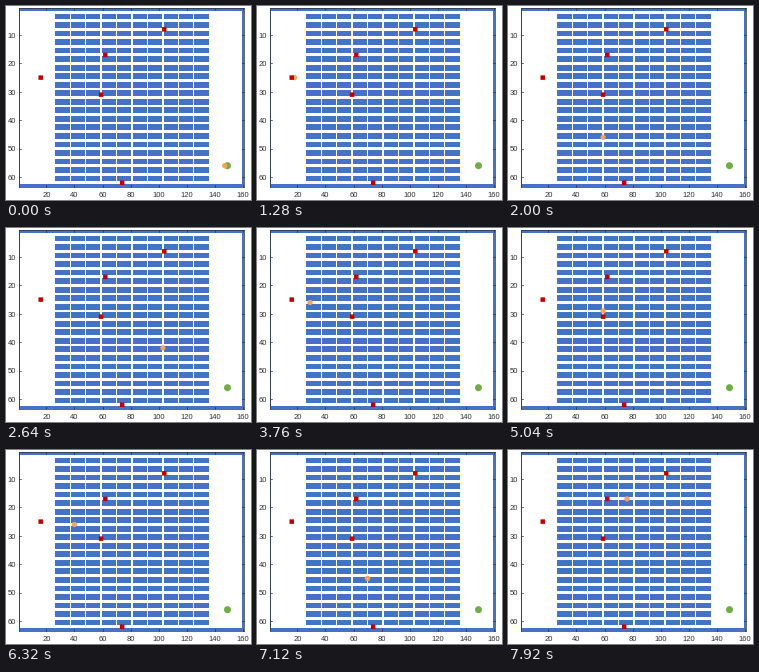
Write a matplotlib script that moves like this. It is 245x194 px and loops after 8000 ms.

```python
from itertools import pairwise

import numpy as np
import matplotlib.pyplot as plt
from matplotlib.animation import FuncAnimation
from matplotlib.patches import Circle, Rectangle

W, H = 245, 194
FRAMES, INTERVAL = 100, 80
SPEED = 10  # grid cells walked per frame

BLUE, RED, GREEN, ORANGE, INK = "#4472C4", "#C00000", "#70AD47", "#F4A45A", "#303030"

plt.rcParams["font.family"] = "Liberation Sans"
fig = plt.figure(figsize=(W / 72, H / 72), dpi=72, facecolor="white")
ax = fig.add_axes([0, 0, 1, 1])
ax.set(xlim=(0, W), ylim=(H, 0))
ax.axis("off")


def px(x):
    return 12.256 + 1.4042 * x


def py(y):
    return 0.57 + 2.8415 * y


def block(x0, y0, x1, y1, color, z):
    """Filled rectangle between two corners in grid units."""
    ax.add_patch(Rectangle((px(x0), py(y0)), px(x1) - px(x0), py(y1) - py(y0),
                           fc=color, ec="none", lw=0, zorder=z))


def line(x0, y0, x1, y1):
    ax.plot([x0, x1], [y0, y1], color=INK, lw=0.7, zorder=8)


# Walls and shelves
block(0.5, 0.5, 160.5, 63.5, BLUE, 1)
block(1.5, 1.5, 159.5, 62.5, "white", 2)
for row in range(20):
    for col in range(10):
        x, y = 26.5 + 11 * col, 2.5 + 3 * row
        block(x, y, x + 10, y + 2, BLUE, 3)

# Frame, ticks and labels
left, right, top, bottom = px(0.5), px(160.5), py(0.5), py(63.5)
for x in (left, right):
    line(x, top, x, bottom)
for y in (top, bottom):
    line(left, y, right, y)
label = dict(fontsize=7.6, color=INK, zorder=9, va="baseline")
for v in range(20, 161, 20):
    line(px(v), bottom, px(v), bottom - 2)
    line(px(v), top, px(v), top + 2)
    ax.text(px(v), 191.2, str(v), ha="center", **label)
for v in range(10, 61, 10):
    line(left, py(v), left + 2, py(v))
    line(right, py(v), right - 2, py(v))
    ax.text(10.3, py(v) + 2.8, str(v), ha="right", **label)

# Depot and items to pick
DEPOT = (149, 56)
ITEMS = NORTH, UPPER, WEST, MID, LOW = (104, 8), (62, 17), (16, 25), (59, 31), (74, 62)
ax.add_patch(Circle((px(DEPOT[0]), py(DEPOT[1])), 3.5, fc=GREEN, ec="none", zorder=4))
SIDE = 4.5
for x, y in ITEMS:
    ax.add_patch(Rectangle((px(x) - SIDE / 2, py(y) - SIDE / 2), SIDE, SIDE,
                           fc=RED, ec="none", snap=False, zorder=6))


def trace(stops, pause):
    """Cells walked between stops; every third row is a cross aisle."""
    cells = []
    for a, b in pairwise(stops):
        on_aisle = a[1] % 3 == 2
        corner = (b[0], a[1]) if on_aisle else (a[0], b[1])
        for p, q in ((a, corner), (corner, b)):
            n = abs(q[0] - p[0]) + abs(q[1] - p[1])
            cells.extend(np.linspace(p, q, n, endpoint=False))
        if b in ITEMS:
            cells.extend([b] * pause)
    return cells


# Detours off the main aisle at column 59
GATE, DOOR, FORK, TURN = (59, 26), (26, 25), (103, 29), (59, 17)
west_trip = [GATE, DOOR, WEST, DOOR, GATE]
north_trip = [FORK, (103, 8), NORTH, FORK, MID]

first_round = [(148, 56), MID, *west_trip, TURN, UPPER, MID, LOW]
later_rounds = [LOW, *north_trip, *west_trip, (59, 30), LOW, MID,
                *north_trip, *west_trip, (59, 35), (70, 62), LOW,
                TURN, UPPER, (103, 17)]
route = trace(first_round, pause=0) + trace(later_rounds, pause=1)

picker = Circle((0, 0), 2.7, fc=ORANGE, ec="none", alpha=0.95, zorder=5)
ax.add_patch(picker)


def update(frame):
    x, y = route[SPEED * frame + 1]
    picker.center = px(x), py(y)
    return (picker,)


anim = FuncAnimation(fig, update, frames=FRAMES, interval=INTERVAL,
                     repeat=True, repeat_delay=0, blit=False)
plt.show()
```
